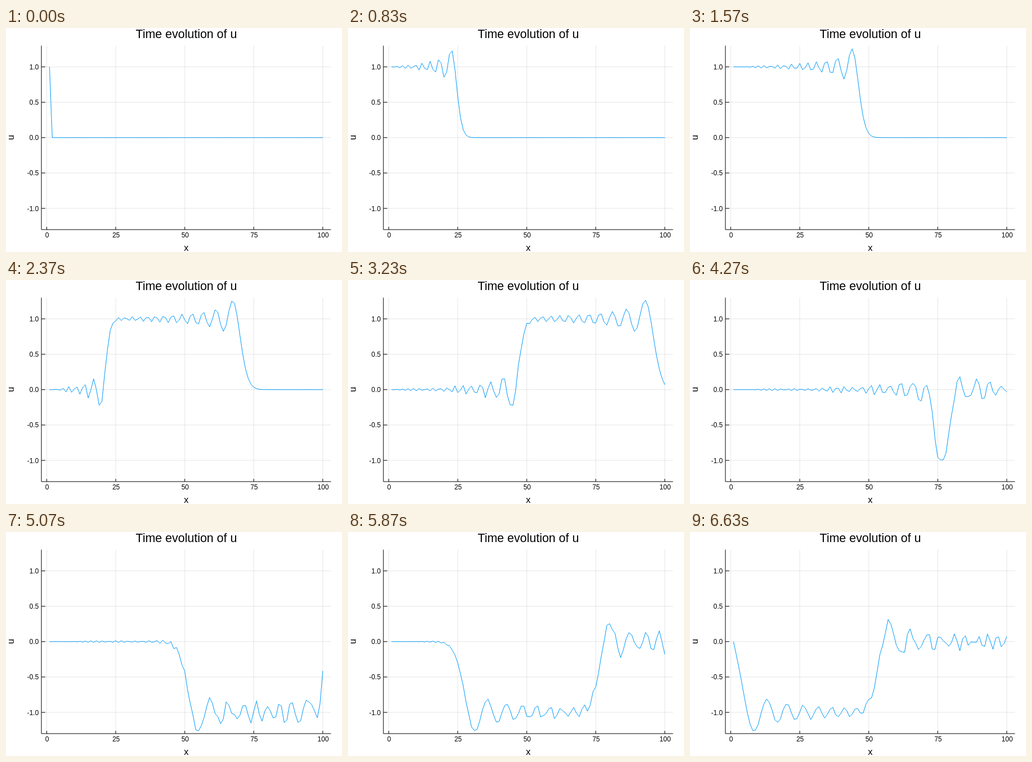
These frames come from a looping animation (600x400 px, 6660 ms). An HTML page:

```html
<!DOCTYPE html>
<html lang="en">
<head>
<meta charset="utf-8">
<title>Time evolution of u</title>
<style>
  html, body { margin: 0; width: 100%; height: 100%; overflow: hidden; background: #fff; }
  svg { display: block; width: 600px; height: 400px; }
  text { font-family: "Liberation Sans", Arial, sans-serif; fill: #000; }
  .grid { stroke: #000; stroke-opacity: .1; }
  .axis { stroke: #000; }
  #wave { fill: none; stroke: #009afa; stroke-linejoin: round; }
</style>
</head>
<body>
<svg id="plot" viewBox="0 0 600 400">
  <clipPath id="area"><rect x="63" y="31" width="518" height="329.5"/></clipPath>
</svg>
<script>
const LOOP = 6660, FRAMES = 200, CELLS = 100;
const STEPS_PER_FRAME = 2, COURANT = 0.5, PULSE_END = 100;
const LEFT = 63.2, RIGHT = 580.4, TOP = 31.5, BOTTOM = 360;
const plot = document.getElementById('plot');

const px = x => 72.72 + 4.93 * x;
const py = u => 195.75 - 126.35 * u;

function add(tag, attrs, content = '') {
  const el = document.createElementNS('http://www.w3.org/2000/svg', tag);
  for (const key in attrs) el.setAttribute(key, attrs[key]);
  el.textContent = content;
  return plot.appendChild(el);
}
const line = (kind, x1, y1, x2, y2) => add('line', { class: kind, x1, y1, x2, y2 });
const label = (content, x, y, size, anchor = 'middle', extra = {}) =>
  add('text', { x, y, 'font-size': size, 'text-anchor': anchor, ...extra }, content);

function drawAxes() {
  const xTicks = [0, 25, 50, 75, 100], yTicks = [-1, -0.5, 0, 0.5, 1];
  for (const x of xTicks) line('grid', px(x), TOP, px(x), BOTTOM);
  for (const u of yTicks) line('grid', LEFT, py(u), RIGHT, py(u));
  line('axis', LEFT, TOP, LEFT, BOTTOM);
  line('axis', LEFT, BOTTOM, RIGHT, BOTTOM);
  for (const x of xTicks) {
    line('axis', px(x), BOTTOM, px(x), BOTTOM - 5);
    label(x, px(x) + 0.6, 374.3, 12);
  }
  for (const u of yTicks) {
    line('axis', LEFT, py(u), LEFT + 7, py(u));
    label(u.toFixed(1), 58.4, py(u) + 4.4, 12, 'end');
  }
  label('Time evolution of u', 322, 18, 21.5);
  label('x', 321.8, 398, 16.5);
  label('u', 0, 0, 16.5, 'middle', { transform: 'translate(14 195.3) rotate(-90)' });
}

// Leapfrog wave equation: a unit pulse enters at the left, the right end is held at zero.
function simulate() {
  let prev = new Float64Array(CELLS + 1), now = prev.slice();
  prev[0] = now[0] = 1;
  const frames = [prev];
  for (let step = 2; frames.length < FRAMES; step++) {
    const next = new Float64Array(CELLS + 1);
    next[0] = step < PULSE_END ? 1 : 0;
    for (let i = 1; i < CELLS; i++) {
      next[i] = 2 * now[i] - prev[i] + COURANT ** 2 * (now[i + 1] - 2 * now[i] + now[i - 1]);
    }
    [prev, now] = [now, next];
    if (step % STEPS_PER_FRAME === 0) frames.push(now);
  }
  return frames;
}

drawAxes();
const wave = add('polyline', { id: 'wave', 'clip-path': 'url(#area)' });
const paths = simulate().map(u =>
  Array.from(u.subarray(0, CELLS), (v, i) => `${px(i + 1).toFixed(2)},${py(v).toFixed(2)}`).join(' '));

// Three pictures per 100 ms, starting at 0, 30 and 70.
function frameAt(time) {
  const t = time % LOOP, rest = t % 100;
  return Math.floor(t / 100) * 3 + (rest >= 30) + (rest >= 70);
}

let start;
function render(now) {
  start ??= now;
  wave.setAttribute('points', paths[frameAt(Math.max(0, now - start))]);
  requestAnimationFrame(render);
}
wave.setAttribute('points', paths[0]);
requestAnimationFrame(render);
</script>
</body>
</html>
```
